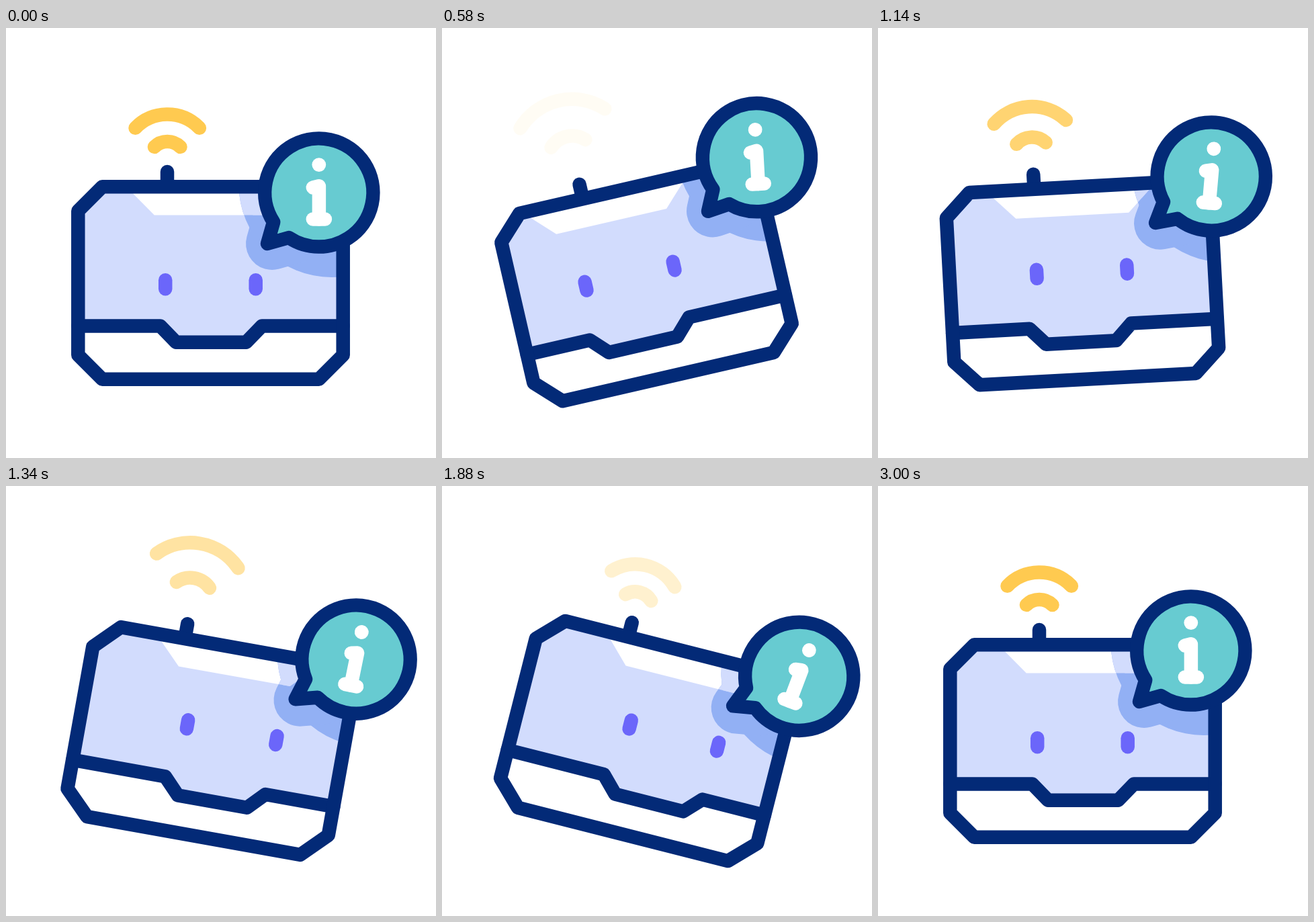
Write an HTML page with a canvas that moves like this. It is 640x640 px and loops after 3020 ms.

```html
<!DOCTYPE html>
<html lang="en">
<head>
<meta charset="utf-8">
<title>Info device</title>
<style>
  html, body { margin: 0; width: 100%; height: 100%; overflow: hidden; background: #fff; }
  canvas { display: block; width: 100vmin; height: 100vmin; }
</style>
</head>
<body>
<canvas id="stage" width="640" height="640"></canvas>
<script>
const canvas = document.getElementById('stage');
const ctx = canvas.getContext('2d');
const dpr = window.devicePixelRatio || 1;
canvas.width = canvas.height = 640 * dpr;

const LOOP = 3020, LINE = 20.5;
const NAVY = '#032a77', FACE = '#d2dcfd', SHADE = '#92b0f4',
      TEAL = '#67cbd1', EYE = '#6b66fa', YELLOW = '#ffca50';
const CX = 304.5, CY = 379.5;   // body pivot
const TIP = [389, 321];         // bubble pivot
const WOBBLE = [0, -10, 10, -9, 10, -9, 10, -10, 0];

const clamp = v => Math.min(1, Math.max(0, v));
const smooth = u => u * u * (3 - 2 * u);
const ease = (t, from, to) => smooth(clamp((t - from) / (to - from)));

// rest -> a, hold, a -> b, hold, b -> rest
const swing = (t, a, b) =>
  a * ease(t, 0, 600) + (b - a) * ease(t, 900, 1500) - b * ease(t, 1800, 2400);

function wobble(t) {
  const u = t / 300, i = Math.floor(u);
  if (i >= WOBBLE.length - 1) return 0;
  return WOBBLE[i] + (WOBBLE[i + 1] - WOBBLE[i]) * smooth(u - i);
}

function rotateAt(x, y, deg) {
  ctx.translate(x, y);
  ctx.rotate(deg * Math.PI / 180);
  ctx.translate(-x, -y);
}

function poly(points, closed) {
  const p = new Path2D();
  points.forEach(([x, y], i) => i ? p.lineTo(x, y) : p.moveTo(x, y));
  if (closed) p.closePath();
  return p;
}

function stroke(path, color, width = LINE) {
  ctx.strokeStyle = color;
  ctx.lineWidth = width;
  ctx.stroke(path);
}

function fill(path, color) {
  ctx.fillStyle = color;
  ctx.fill(path);
}

function disc(x, y, r) {
  const p = new Path2D();
  p.arc(x, y, r, 0, Math.PI * 2);
  return p;
}

const shell = poly([
  [143.3, 236.2], [465.7, 236.2], [501.7, 272.2], [501.7, 486.8],
  [465.7, 522.8], [143.3, 522.8], [107.3, 486.8], [107.3, 272.2]
], true);

const antenna = poly([[240, 214], [240, 236]]);

function makeBubble() {
  const x = 465.8, y = 245, r = 80.6, p = new Path2D();
  p.moveTo(...TIP);
  p.arc(x, y, r, Math.atan2(44, -67.8), Math.atan2(67, -44.8) + Math.PI * 2);
  p.closePath();
  return p;
}
const bubble = makeBubble();
const shadeDisc = disc(484.5, 233, 138);
const shadeTail = poly([[405, 289], [396, 321], [428, 312]]);

function wave(k, half, endY, topY) {
  const ax = 248, ay = 250, sag = endY - topY;
  const r = (half * half + sag * sag) / (2 * sag);
  const a = Math.asin(half / r), up = -Math.PI / 2;
  const p = new Path2D();
  p.arc(ax + (240.2 - ax) * k, ay + (topY + r - ay) * k, r * k, up - a, up + a);
  stroke(p, YELLOW);
}

function drawWaves(t) {
  let alpha, k = 1;
  if (t >= 2700) {
    alpha = clamp((t - 2700) / 300);
  } else {
    const u = t % 900;
    const fadeIn = t < 900 ? 1 : clamp(u / 300);
    alpha = Math.min(fadeIn, clamp((600 - u) / 300));
    k = 1 + 0.355 * ease(u, 0, 600);
  }
  if (alpha <= 0) return;
  ctx.globalAlpha = alpha;
  wave(k, 47.7, 148.8, 128.6);
  wave(k, 19.3, 177, 169);
  ctx.globalAlpha = 1;
}

function enterBubble(t) {
  const out = ease(t, 0, 600) - ease(t, 1800, 2400);
  ctx.translate(28.7 * out, -25 * out);
  rotateAt(...TIP, wobble(t));
}

function drawShade(t, color) {
  ctx.save();
  enterBubble(t);
  fill(shadeDisc, color);
  stroke(shadeTail, color, 78);
  ctx.restore();
}

function drawBody(t) {
  const m = swing(t, -26.5, 27);
  const b = swing(t, -31, 27.5);
  const ex = swing(t, -22, 39.7), ey = swing(t, -18, -21);

  const mouth = [
    [107.3, 443.4], [229.5 + m, 443.4], [253 + m, 467.7],
    [357.5 + m, 467.7], [381 + m, 443.4], [501.7, 443.4]
  ];
  const band = poly([
    [179 + b, 236.2], [220.8 + b, 278.5], [389 + b, 278.5], [431 + b, 236.2]
  ], true);
  const face = poly([
    [107.3, 272.2], [143.3, 236.2], [465.7, 236.2], [501.7, 272.2],
    ...mouth.slice().reverse()
  ], true);

  stroke(antenna, NAVY);
  fill(shell, '#fff');

  ctx.save();
  ctx.clip(face);
  fill(face, FACE);
  fill(band, '#fff');
  drawShade(t, SHADE);
  ctx.clip(band);
  drawShade(t, FACE);
  ctx.restore();

  for (const x of [237.2, 371.7])
    stroke(poly([[x + ex, 375.2 + ey], [x + ex, 388.3 + ey]]), EYE);

  stroke(poly(mouth), NAVY);
  stroke(shell, NAVY);
}

function drawBubble(t) {
  ctx.save();
  enterBubble(t);
  fill(bubble, TEAL);
  stroke(bubble, NAVY);
  fill(disc(465.8, 203.6, 10.4), '#fff');
  stroke(poly([[456.8, 237.4], [465.9, 235.2], [465.9, 284.4]]), '#fff');
  stroke(poly([[456.8, 284.4], [474.9, 284.4]]), '#fff');
  ctx.restore();
}

function draw() {
  const t = performance.now() % LOOP;
  ctx.setTransform(dpr, 0, 0, dpr, 0, 0);
  ctx.fillStyle = '#fff';
  ctx.fillRect(0, 0, 640, 640);
  ctx.lineCap = ctx.lineJoin = 'round';
  rotateAt(CX, CY, swing(t, -13, 15));
  drawWaves(t);
  drawBody(t);
  drawBubble(t);
  requestAnimationFrame(draw);
}
draw();
</script>
</body>
</html>
```
